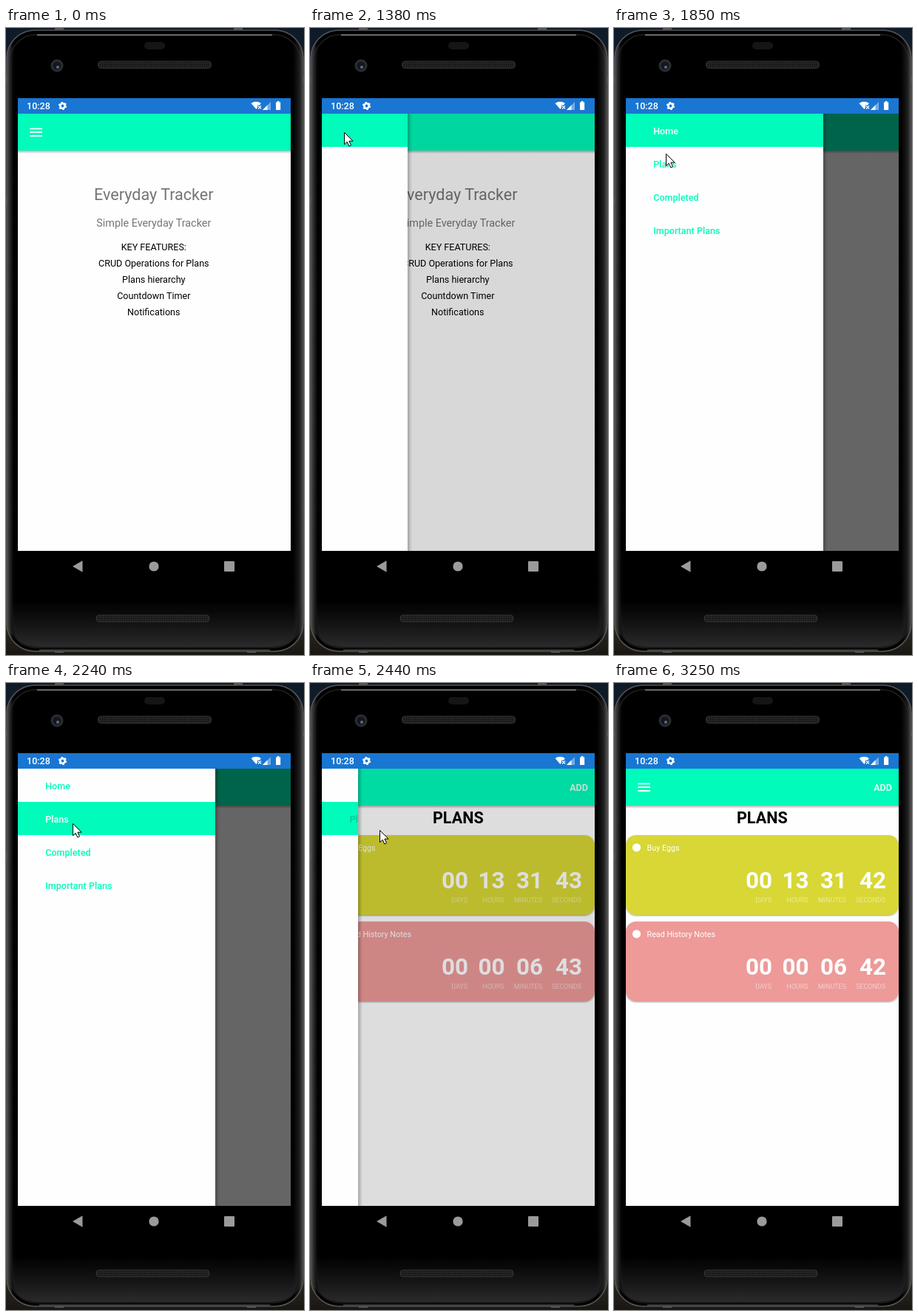
An HTML page that plays this animation: 403 px wide and 849 px high, repeating every 3.58 s.

```html
<!DOCTYPE html>
<html lang="en">
<head>
<meta charset="utf-8">
<title>Planner demo</title>
<style>
html, body { margin: 0; width: 100%; height: 100%; overflow: hidden; background: #0f1a29; }
svg { display: block; width: 403px; height: 849px; font-family: Roboto, sans-serif; font-size: 12.57px; }
.mid { text-anchor: middle; }
.end { text-anchor: end; }
.med { font-weight: 500; }
.bold { font-weight: 700; }
.white { fill: #fff; }
.mint { fill: #00fbbb; }
</style>
</head>
<body>
<svg viewBox="0 0 403 849">
  <defs>
    <linearGradient id="back" x2="0" y2="1">
      <stop offset="0" stop-color="#0f1a29"/><stop offset=".5" stop-color="#20242a"/>
      <stop offset=".9" stop-color="#43352a"/><stop offset="1" stop-color="#191713"/>
    </linearGradient>
    <linearGradient id="rim">
      <stop offset="0" stop-color="#4b4b4b"/><stop offset=".012" stop-color="#292929"/>
      <stop offset=".02" stop-color="#070707"/><stop offset=".03" stop-color="#000"/>
      <stop offset=".965" stop-color="#000"/><stop offset=".985" stop-color="#191919"/>
      <stop offset="1" stop-color="#4b4b4b"/>
    </linearGradient>
    <linearGradient id="foot" x2="0" y2="1">
      <stop offset="0" stop-color="#222" stop-opacity="0"/><stop offset="1" stop-color="#2b2b2b"/>
    </linearGradient>
    <linearGradient id="drop" x2="0" y2="1">
      <stop offset="0" stop-opacity=".3"/><stop offset="1" stop-opacity="0"/>
    </linearGradient>
    <linearGradient id="side">
      <stop offset="0" stop-opacity=".25"/><stop offset="1" stop-opacity="0"/>
    </linearGradient>
    <pattern id="mesh" width="3" height="3" patternUnits="userSpaceOnUse">
      <rect width="3" height="3" fill="#262626"/><circle cx="1.5" cy="1.5" r=".9" fill="#101010"/>
    </pattern>
    <filter id="lift" x="-5%" y="-5%" width="110%" height="115%">
      <feDropShadow dx="0" dy="1" stdDeviation="1" flood-opacity=".4"/>
    </filter>
    <clipPath id="screen"><rect x="16" y="116" width="369" height="592"/></clipPath>
    <clipPath id="edge"><rect id="edgeBox" x="16" y="116" height="592"/></clipPath>
  </defs>

  <!-- phone -->
  <rect width="403" height="849" fill="url(#back)"/>
  <path d="M0 65h4v8h-4zM399 65h4v8h-4zM0 230h4v10h-4zM66 838h12v8h-12zM326 838h12v8h-12zM66 0h12v6h-12zM308 0h12v6h-12z" fill="#555"/>
  <rect x="1" y="3" width="401" height="841" rx="38" fill="url(#rim)" stroke="#555" stroke-width="1.5"/>
  <rect x="6" y="9" width="391" height="830" rx="34" fill="none" stroke="#202020" stroke-width="1.5"/>
  <path d="M8 775h387v28q0 35-36 35h-315q-36 0-36-35z" fill="url(#foot)"/>
  <path d="M42 9.500h318" stroke="#85898a" stroke-width="1.5"/>
  <path d="M45 842.500h312" stroke="#464646" stroke-width="2"/>
  <rect x="187" y="19" width="28" height="10" rx="5" fill="#151515"/>
  <circle cx="69" cy="51" r="8.500" fill="#2b2d31"/>
  <circle cx="69" cy="51" r="5.500" fill="#12181f"/>
  <circle cx="70" cy="53" r="2" fill="#597184"/>
  <rect x="124.500" y="45" width="153" height="9.500" rx="4" fill="url(#mesh)" stroke="#343434"/>
  <rect x="122" y="795" width="153" height="9" rx="4" fill="url(#mesh)" stroke="#343434"/>
  <rect x="16" y="95" width="369" height="21" fill="#1976d2"/>
  <g class="white">
    <text class="med" x="28" y="110">10:28</text>
    <circle cx="76.500" cy="105.500" r="3.200" fill="none" stroke="#fff" stroke-width="2.600"/>
    <circle cx="76.500" cy="105.500" r="4.700" fill="none" stroke="#fff" stroke-width="1.800" stroke-dasharray="2.460"/>
    <path d="M331.500 102q6.500-4.500 13.500 0l-2 2.600h-3v3l-1.500 2.400z"/>
    <path d="M341 105.500l4 4m0-4l-4 4" stroke="#fff" stroke-width="1.300"/>
    <path d="M347 111l11-11v11z" opacity=".4"/><path d="M347 111l6.500-6.500v6.500z"/>
    <path d="M365 100.500h1.800v-1.500h2.600v1.500h1.800v10.500h-6.200z"/>
  </g>
  <g fill="#9b9b9b">
    <path d="M90 729l13.500-7.700v15.400z"/><circle cx="200" cy="729" r="6.600"/>
    <rect x="295" y="722" width="14" height="14" rx="1"/>
  </g>

  <!-- app -->
  <g clip-path="url(#screen)">
    <rect x="16" y="116" width="369" height="592" fill="#fefefe"/>
    <rect x="16" y="166" width="369" height="4" fill="url(#drop)"/>
    <rect class="mint" x="16" y="116" width="369" height="50"/>
    <path class="white" d="M32.300 135.500h16.700v1.800h-16.700zm0 4.800h16.700v1.800h-16.700zm0 4.800h16.700v1.800h-16.700z"/>
    <g id="home" class="mid">
      <g fill="#757575">
        <text x="199.800" y="232.500" font-size="21.550">Everyday Tracker</text>
        <text x="199.800" y="269" font-size="14.360">Simple Everyday Tracker</text>
      </g>
    </g>
    <g id="plans">
      <text class="med white end" x="376" y="146">ADD</text>
      <text class="bold mid" x="200.300" y="189.500" font-size="21.550">PLANS</text>
    </g>
    <rect id="scrim" x="16" y="116" width="369" height="592"/>
    <g id="drawer">
      <rect x="283" y="116" width="6" height="592" fill="url(#side)"/>
      <rect x="16" y="116" width="267" height="592" fill="#fefefe"/>
      <rect id="pick" class="mint" x="16" width="267" height="45"/>
    </g>
    <text id="ghost" class="med" x="53.500" y="188.900" fill="#00c995" clip-path="url(#edge)">Plans</text>
  </g>
  <path id="cursor" d="M.5.5v16.200l3.700-3.500 2.600 5.800 2.700-1.200-2.600-5.700h5.200z" fill="#fff" stroke="#000"/>
</svg>
<script>
const LOOP = 3580, SCREEN = 16, WIDTH = 267;
const $ = id => document.getElementById(id);
const clamp = v => Math.max(0, Math.min(1, v));
const show = (el, on) => { el.style.display = on ? '' : 'none'; };

function add(parent, tag, attrs, text = '') {
  const el = document.createElementNS('http://www.w3.org/2000/svg', tag);
  for (const k in attrs) el.setAttribute(k, attrs[k]);
  el.textContent = text;
  return parent.appendChild(el);
}

['KEY FEATURES:', 'CRUD Operations for Plans', 'Plans hierarchy', 'Countdown Timer', 'Notifications']
  .forEach((s, i) => add($('home'), 'text', { x: 199.8, y: 301 + 22.1 * i }, s));

const rows = ['Home', 'Plans', 'Completed', 'Important Plans']
  .map((s, i) => add($('drawer'), 'text', { x: 53.2, y: 143.9 + 45 * i, class: 'med' }, s));

const units = [['DAYS', 213], ['HOURS', 262.5], ['MINUTES', 314], ['SECONDS', 367]];
function card(y, fill, name, values) {
  const g = add($('plans'), 'g', { class: 'white' });
  add(g, 'rect', { x: SCREEN, y, width: 369, height: 108, rx: 14, fill, filter: 'url(#lift)' });
  add(g, 'circle', { cx: 30.5, cy: y + 16.8, r: 5.6 });
  add(g, 'text', { x: 44.5, y: y + 21, 'font-size': 10.77 }, name);
  return units.map(([label, x], i) => {
    add(g, 'text', { x, y: y + 91, class: 'end', 'font-size': 8.98, opacity: .5 }, label);
    return add(g, 'text', { x: x + 1, y: y + 71.7, class: 'end bold', 'font-size': 31.4 }, values[i]);
  })[3];
}
const seconds = [
  card(206, '#d8d734', 'Buy Eggs', ['00', '13', '31']),
  card(323, '#ed9a99', 'Read History Notes', ['00', '00', '06'])
];

const ticks = [0, 180, 250, 310, 380, 450, 510, 580, 650, 710, 780, 840, 910, 970, 1040,
  1240, 1310, 1380, 1450, 1520, 1580, 1640, 1710, 1780, 1850, 1910, 1980,
  2120, 2180, 2240, 2370, 2440, 2510, 2570, 2640,
  2710, 2780, 2840, 2910, 2980, 3050, 3120, 3190, 3250];

// pointer path: time, x, y
const path = [[180, 341, 814], [310, 215, 560], [450, 90, 280], [580, 12, 130], [650, 0, 111],
  [710, 3, 107], [780, 16, 115], [840, 28, 128], [910, 37, 136], [1040, 45, 140],
  [1380, 46, 141], [1520, 47, 146], [1710, 48, 148], [1980, 90, 190], [2240, 90, 190],
  [2440, 94, 199], [2710, 105, 222], [2910, 230, 500], [3190, 367, 843]];

function pointer(t) {
  const i = Math.max(1, path.findIndex(p => p[0] >= t));
  const [a, b] = [path[i - 1], path[i]];
  const k = (t - a[0]) / (b[0] - a[0]);
  return [a[1] + (b[1] - a[1]) * k, a[2] + (b[2] - a[2]) * k];
}

const settle = (t, start) => 1 - (1 - clamp((t - start) / 270)) ** 5;

function draw(now) {
  const time = now % LOOP;
  const t = ticks.filter(v => v <= time).pop();
  const closing = t >= 2362;
  const open = closing ? 1 - settle(t, 2362) : settle(t, 1351);
  const shade = closing ? open ** .9 : clamp((t - 1320) / 241);
  const row = t >= 2180 ? 1 : 0;

  show($('home'), !closing);
  show($('plans'), closing);
  $('scrim').setAttribute('opacity', .6 * shade);

  show($('drawer'), open > .001);
  $('drawer').setAttribute('transform', `translate(${Math.round(WIDTH * (open - 1))})`);
  $('pick').setAttribute('y', 116 + 45 * row);
  rows.forEach((el, i) => el.setAttribute('fill', i === row ? '#fff' : '#00fbbb'));
  show($('ghost'), closing && open > .1 && open < .5);
  $('edgeBox').setAttribute('width', WIDTH * open);

  seconds.forEach(el => { el.textContent = t < 2980 ? '43' : '42'; });

  const visible = t >= 180 && t < 3250;
  show($('cursor'), visible);
  if (visible) $('cursor').setAttribute('transform', `translate(${pointer(t).map(Math.round)})`);
}

let begin;
function frame(now) {
  begin ??= now;
  draw(now - begin);
  requestAnimationFrame(frame);
}
draw(0);
requestAnimationFrame(frame);
</script>
</body>
</html>
```
